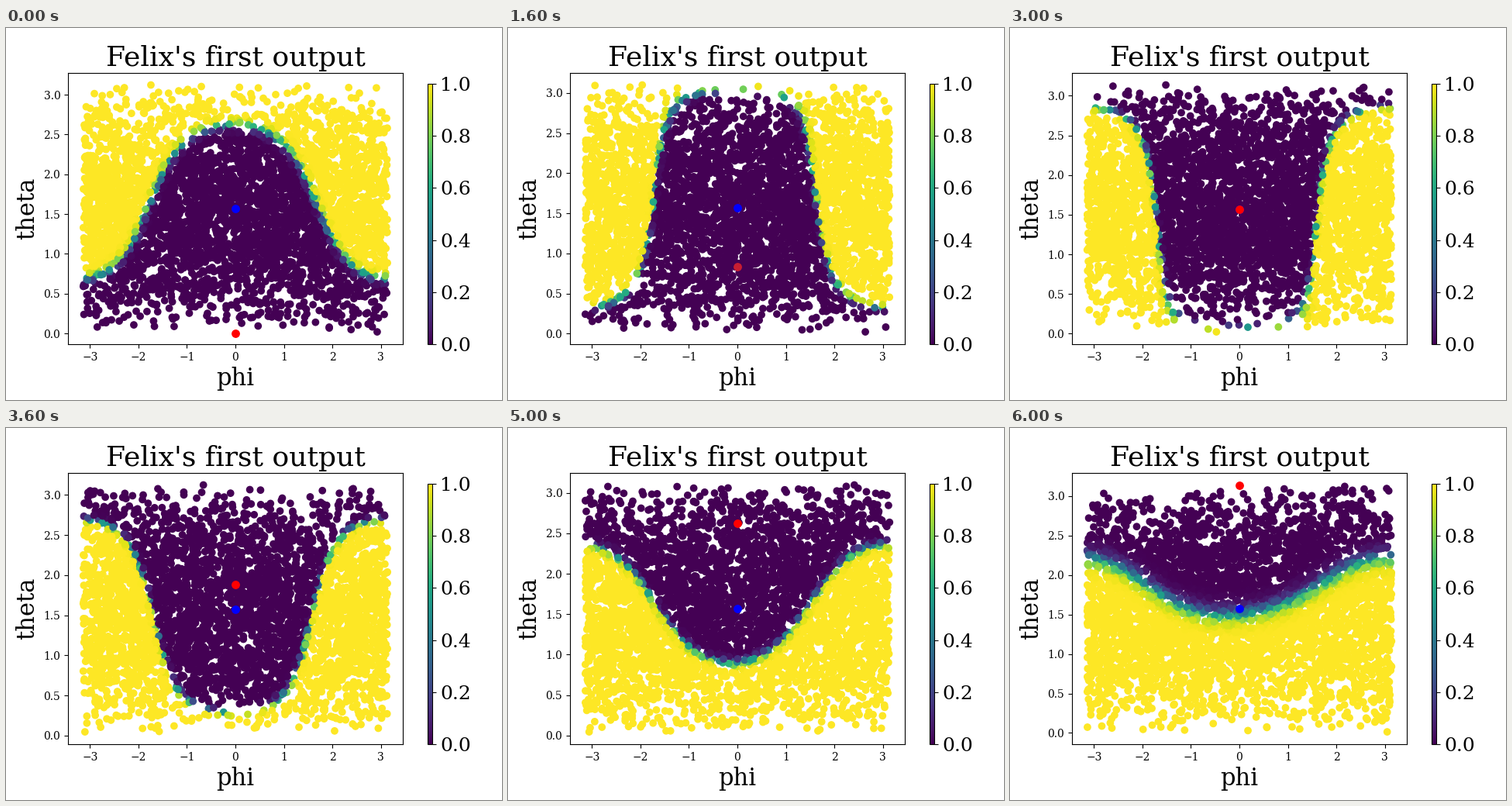
These frames come from a looping animation (640 by 480 pixels, 6200 ms). A matplotlib script:

```python
import matplotlib.pyplot as plt
import numpy as np
from matplotlib.animation import FuncAnimation

STEPS = 31
COUNT = 4000
PI = np.pi

plt.rcParams["font.family"] = "DejaVu Serif"


def sample(step):
    """Random points spread evenly over the sphere."""
    rng = np.random.default_rng(100 + step)
    phi = rng.uniform(-PI, PI, COUNT)
    theta = np.arccos(rng.uniform(-1, 1, COUNT))
    return phi, theta


def output(t, phi, theta):
    """0 inside a cap that tilts from one pole to the other, 1 outside."""
    polar = 0.965 + 1.33 * t + 0.485 * t**2
    radius = 1.65 + 0.1 * t - 0.47 * t**4
    azimuth = -0.05 - 0.1 * t**4
    bulge = 0.08 * (2 * t - 1) ** 2
    sharp = 40 + 130 * t - 150 * t**2
    inside = (np.sin(polar) * np.sin(theta) * np.cos(phi - azimuth)
              + np.cos(polar) * np.cos(theta) - np.cos(radius)
              + bulge * np.sin(phi) ** 2 * np.sin(theta))
    return 1 / (1 + np.exp(sharp * inside))


fig, ax = plt.subplots(figsize=(6.4, 4.8), dpi=100)
fig.subplots_adjust(left=0.125, right=0.8, bottom=0.15, top=0.88)
ax.set_title("Felix's first output", fontsize=26)
ax.set_xlabel("phi", fontsize=22)
ax.set_ylabel("theta", fontsize=22)
ax.set_xlim(-1.1 * PI, 1.1 * PI)

phi, theta = sample(0)
cloud = ax.scatter(phi, theta, c=output(0, phi, theta), cmap="viridis",
                   vmin=0, vmax=1)
ax.scatter([0], [PI / 2], s=46, color="blue", zorder=3)
red = ax.scatter([0], [0], s=46, color="red", zorder=4)

cax = fig.add_axes([0.85, 0.15, 0.01, 0.7])
fig.colorbar(cloud, cax=cax)
cax.tick_params(labelsize=18)


def update(step):
    t = step / (STEPS - 1)
    phi, theta = sample(step)
    cloud.set_offsets(np.column_stack([phi, theta]))
    cloud.set_array(output(t, phi, theta))
    red.set_offsets([(0, PI * t)])
    red.set_color("#c81e32" if 0 < t < 0.5 else "red")
    low, high = theta.min(), max(theta.max(), PI * t)
    margin = 0.05 * (high - low)
    ax.set_ylim(low - margin, high + margin)
    return cloud, red


anim = FuncAnimation(fig, update, frames=STEPS, interval=200,
                     repeat=True, repeat_delay=0, blit=False)
plt.show()
```
